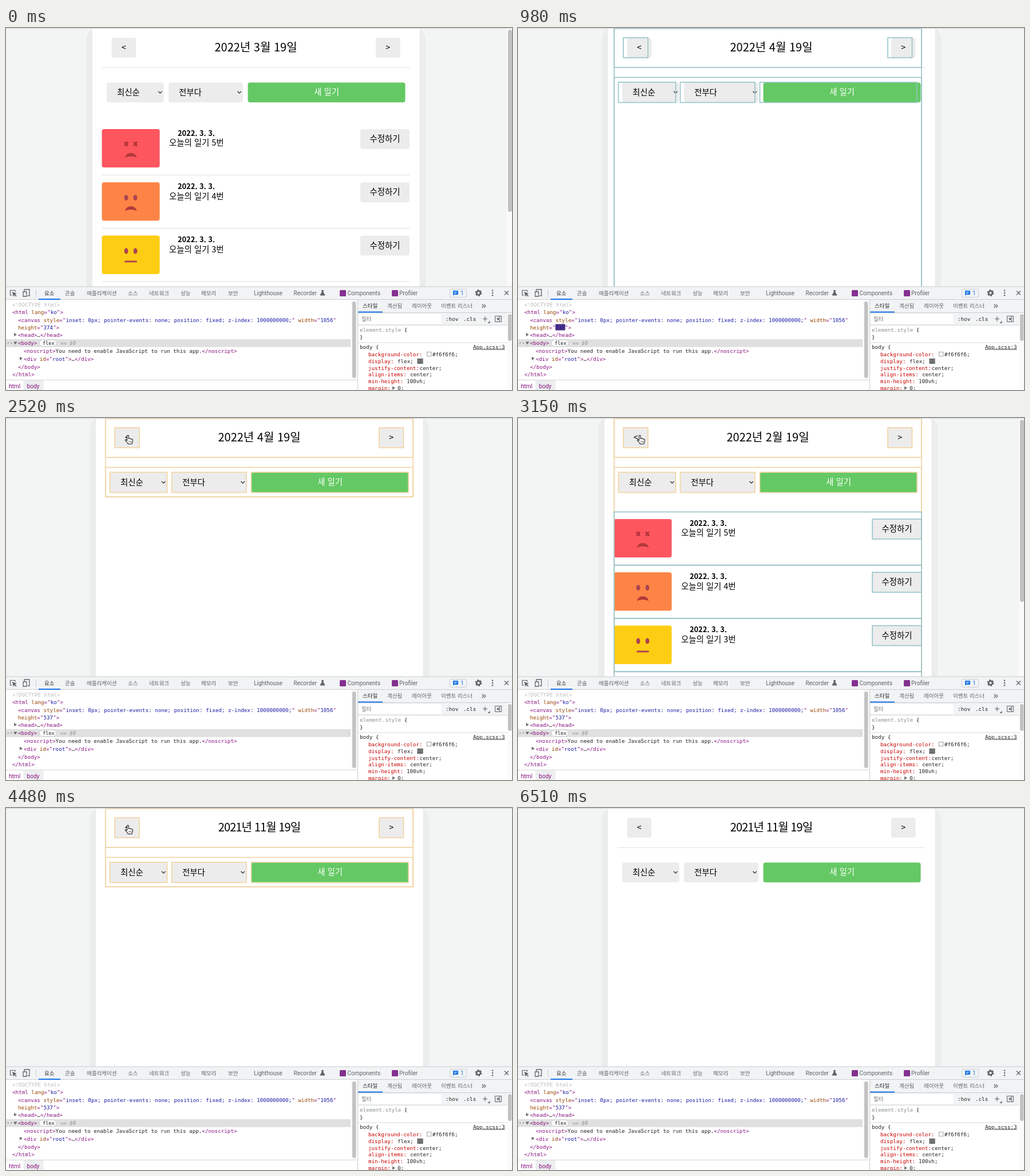
Write an HTML page that moves like this. It is 884 px wide and 634 px high and loops after 6.93 s.

```html
<!DOCTYPE html>
<html lang="ko">
<head>
<meta charset="utf-8">
<style>
html, body { margin: 0; width: 100%; height: 100%; overflow: hidden; background: #f3f5f5; }
svg { display: block; }
text { white-space: pre; }
.page { font: 14.4px "Noto Sans CJK KR", "Noto Sans CJK", sans-serif; }
.ui { font: 10.1px Roboto, "Noto Sans CJK KR", "Noto Sans CJK", sans-serif; fill: #5f6368; }
.ko { font: 9.5px "Noto Sans CJK KR", "Noto Sans CJK", sans-serif; fill: #5f6368; }
.code { font: 9.24px "DejaVu Sans Mono", monospace; fill: #222; }
.t { fill: #881280; } .a { fill: #994500; } .v { fill: #1a1aa6; }
.g { fill: #8a8f94; } .l { fill: #bdbdbd; } .r { fill: #c80000; } .k { fill: #222; }
.out { fill: none; stroke-width: 1.6; }
</style>
</head>
<body>
<svg id="stage" width="884" height="634" viewBox="0 0 884 634"></svg>
<script>
const esc = s => s.replace(/&/g, '&amp;').replace(/</g, '&lt;');
const rect = (x, y, w, h, fill, rx = 0, more = '') =>
  `<rect x="${x}" y="${y}" width="${w}" height="${h}" fill="${fill}" rx="${rx}" ${more}/>`;
const text = (x, y, s, cls = '', more = '') => `<text x="${x}" y="${y}" class="${cls}" ${more}>${esc(s)}</text>`;
const path = (d, stroke, width = 1, fill = 'none') =>
  `<path d="${d}" stroke="${stroke}" stroke-width="${width}" fill="${fill}"/>`;
const mid = 'text-anchor="middle"';
// Coloured code: parts split by "~", each led by its class letter
const code = (x, y, s) => `<text x="${x}" y="${y}" class="code">` +
  s.split('~').map(p => `<tspan class="${p[0]}">${esc(p.slice(1))}</tspan>`).join('') + '</text>';
const box = (x, y, r, b) => `<rect x="${x}" y="${y}" width="${r - x}" height="${b - y}"/>`;

const PITCH = 93.3;
const rows = [0, 1, 2].map(i => i * PITCH);
const button = (x, y, w, label, fill = '#ececec', ink = '#000') =>
  rect(x, y, w, 34.8, fill, 4) + text(x + w / 2, y + 21.8, label, '', `${mid} fill="${ink}"`);
const select = (x, w, label) => rect(x, 95.5, w, 34.8, '#ececec', 4) +
  text(x + 18, 117.5, label) + path(`M${x + w - 9.5} 111l3.2 3.2 3.2-3.2`, '#222', 1.1);

function eyes(i) {
  return [210, 226].map(x => i
    ? `<ellipse cx="${x}" cy="204" rx="3.4" ry="5" fill="#b5423f"/><ellipse cx="${x - 1}" cy="203" rx="1.3" ry="3" fill="#8f4a80"/>`
    : path(`M${x - 3} 199.5l6 7m0-7l-6 7`, '#b5333b', 2.8)).join('');
}

function item(y, i) {
  const mouth = i < 2
    ? path('M208 227Q210 219 218 219T228.500 227Q218 222.500 208 227Z', 'none', 0, '#b0383a')
    : rect(207, 221, 22, 3, '#b0444f', 1.5);
  return `<g transform="translate(0 ${y})">` +
    rect(167.5, 177, 101, 67.3, ['#fd565f', '#fd8446', '#fdcd14'][i], 4) + eyes(i) + mouth +
    text(332.5, 188.8, '2022. 3. 3.', '', `${mid} font-size="12.8" font-weight="bold"`) +
    text(285, 206.3, `오늘의 일기 ${5 - i}번`) + button(619, 177.2, 86, '수정하기') +
    rect(168, 257, 537, 1, '#dfdfdf') + '</g>';
}

const page = `<g class="page"><g id="sheet">
  ${rect(140.5, -4, 592.5, 480, '#ebecec', 24)}${rect(151, 0, 571.5, 453, '#fff')}
  ${rect(168, 69, 537, 1, '#e2e2e2')}
  ${button(184.5, 17.3, 42.5, '<')}${button(646, 17.3, 42.5, '>')}
  ${text(436.5, 40.5, '', '', `id="title" ${mid} font-size="20"`)}
  ${select(176, 99.6, '최신순')}${select(284, 130, '전부다')}
  ${button(422.5, 95.5, 275, '새 일기', '#64c964', '#fff')}
  <g id="list">${rows.map(item).join('')}</g></g>
  <g id="bar">${rect(875, 0, 9, 453, '#fafafa')}${rect(877, 3, 7, 319, '#c2c2c2', 3.5)}</g></g>`;

const outlines = `<g id="head" class="out">
  ${box(167.8, 1, 705, 69)}
  ${[[184, 17, 227, 52], [646, 17, 688.5, 52], [175.5, 95, 275.5, 130.5], [283.5, 95, 414, 130.5],
    [422.5, 95, 697, 130.5]].map(b => box(...b)).join('')}
  <g id="tall">${box(167.8, 1, 705, 460)}${box(167.8, 86.5, 705, 460)}</g>
  <g id="short">${box(167.8, 1, 705, 138)}${box(167.8, 86.5, 705, 138)}</g></g>
  <g id="items" class="out" stroke="#96c3c7">
  ${rows.map(y => box(167.8, 164.5 + y, 705, 257.5 + y) + box(619, 177 + y, 705, 212 + y)).join('')}
  ${box(167.8, 444.5, 705, 540)}</g>`;

const cursor = `<g id="hand">${path('M211.500 40V31.500q0-1.500 1.300-1.500t1.300 1.500V36q2-1 2.600.500 2-.8 2.500.700 2.300-.5 2.300 1.500 0 3.500-1.500 5.300v1.500h-7v-1.300l-4.500-4.700q-.8-1.500.7-2 1.300 0 2.300 2.500Z', '#222', 1.1, '#fff')}
  ${path('M215 40v3m2-3v3m2-3v3', '#333', .7)}</g>`;

const tabs = [[67, '요소'], [103, '콘솔'], [141, '애플리케이션'], [213, '소스'], [250, '네트워크'],
  [305, '성능'], [341, '메모리'], [388, '보안']];
const arrow = (x, y, down) => path(down ? `M${x} ${y - 2}h6l-3 5z` : `M${x} ${y - 3}l5 3-5 3z`, 'none', 0, '#6e6e6e');

const toolbar = rect(0, 453, 884, 181, '#fff') + rect(0, 453, 884, 23, '#f1f3f4') +
  rect(0, 452.5, 884, 1, '#cacdd1') + rect(0, 475, 884, 1, '#cacdd1') + rect(57, 474, 38, 2, '#1a73e8') +
  path('M16 462v-2.500h-8.500v8.500h3', '#5f6368', 1.2) + path('M11 462l8 3-3.400 1.200 3 3-1.300 1.300-3-3-1.300 3.400z', 'none', 0, '#5f6368') +
  path('M32 461v-3h9v11h-3M30 462h6v8h-6z', '#5f6368', 1.3) + rect(52, 458, 1, 13, '#cacdd1') +
  tabs.map(([x, s], i) => text(x, 467.6, s, 'ko', i ? '' : 'style="fill:#222"')).join('') +
  text(433, 467.8, 'Lighthouse', 'ui') + text(502.500, 467.8, 'Recorder', 'ui') +
  path('M551 459.500h4m-3 0v3l-3 5.500h8l-3-5.500v-3z', '#5f6368', 1, '#5f6368') +
  rect(583, 459, 11, 11, '#84308f', 1.5) + text(596.5, 467.8, 'Components', 'ui') +
  rect(674, 459, 11, 11, '#84308f', 1.5) + text(687, 467.8, 'Profiler', 'ui') +
  rect(775.5, 457.5, 29, 14, '#f1f3f4', 2, 'stroke="#cacdd1"') +
  path('M781 460h9v7h-7l-2 2z', 'none', 0, '#1a73e8') + path('M783 462.500h5m-5 2h3.500', '#fff', .8) +
  text(794, 467.8, '1', 'ui', 'style="fill:#1a73e8"') +
  '<circle cx="825.5" cy="464" r="3.4" fill="none" stroke="#5f6368" stroke-width="2.6"/>' +
  '<circle cx="825.5" cy="464" r="5" fill="none" stroke="#5f6368" stroke-width="2" stroke-dasharray="2.6 2.636"/>' +
  [459.8, 464, 468.2].map(y => `<circle cx="850" cy="${y}" r="1.3" fill="#5f6368"/>`).join('') +
  path('M871 460.500l7 7m0-7l-7 7', '#5f6368', 1.4);

const elements = rect(0, 545, 602.5, 13.8, '#e0e0e0') +
  code(11, 487.5, 'l<!DOCTYPE html>') +
  code(11, 501, 't<html ~alang~t="~vko~t">') +
  code(21, 514.5, 't<canvas ~astyle~t="~vinset: 0px; pointer-events: none; position: fixed; z-index: 1000000000;~t" ~awidth~t="~v1056~t"') +
  rect(65.3, 518.5, 17.2, 11, 'rgb(80,47,130)', 1, 'id="flash"') +
  `<text x="21" y="527.6" class="code"><tspan class="a">height</tspan><tspan class="t">="</tspan><tspan id="height" class="v"></tspan><tspan class="t">"&gt;</tspan></text>` +
  arrow(14, 537, 0) + code(21, 541, 't<head>~k…~t</head>') +
  text(1, 555, '···', 'code') + arrow(13.5, 551.5, 1) + code(21, 555, 't<body>') +
  rect(58.500, 546.5, 29.500, 11, '#fff', 5.500, 'stroke="#cacdd1"') +
  text(64, 554.8, 'flex', 'code', 'style="font-size:8.6px"') +
  text(95, 555, '== ', 'code', 'style="fill:#8a8f94"') + text(111, 555, '$0', 'code', 'style="fill:#8a8f94;font-style:italic"') +
  code(31, 569, 't<noscript>~kYou need to enable JavaScript to run this app.~t</noscript>') +
  arrow(24, 578.8, 0) + code(31, 582.6, 't<div ~aid~t="~vroot~t">~k…~t</div>') +
  code(21, 596.5, 't</body>') + code(11, 610, 't</html>') +
  rect(602.5, 476, 11, 140, '#fafafa') + rect(605, 479, 6.5, 134, '#c2c2c2', 3.2) +
  rect(0, 616, 614, 1, '#d5d7da') + rect(30.5, 617, 35, 17, '#eceef0') +
  text(5, 630.5, 'html', 'ui', 'style="fill:#881280"') + text(36.5, 630.5, 'body', 'ui', 'style="fill:#881280"');

const property = (y, name, value, x) => text(633, y, name + ':', 'code', 'style="fill:#c80000"') + text(x, y, value, 'code');
const styles = rect(614, 476, 270, 44, '#f1f3f4') + rect(614, 476, 1, 158, '#cacdd1') +
  rect(615, 498, 269, 1, '#cacdd1') + rect(615, 496.500, 43, 2, '#1a73e8') + rect(615, 520, 261, 1, '#d5d7da') +
  [[623, '스타일'], [666, '계산됨'], [709, '레이아웃'], [760, '이벤트 리스너']].map(([x, s], i) =>
    text(x, 490.3, s, 'ko', i ? '' : 'style="fill:#222"')).join('') +
  path('M831.500 484l3 3-3 3m3.500-6l3 3-3 3', '#5f6368', 1.1) +
  rect(616, 501, 144, 17, '#fff') + text(621, 513, '필터', 'ko', 'style="fill:#757575"') +
  text(768, 513, ':hov', 'code') + text(799, 513, '.cls', 'code') +
  path('M833 509.500h8m-4-4v8', '#5f6368', 1.2) + path('M845.500 513v4h-4z', 'none', 0, '#5f6368') +
  path('M854.500 504.500h11v10h-11zM862.500 504.500v10', '#5f6368', 1) + path('M861 506.500v6l-4-3z', 'none', 0, '#5f6368') +
  code(618, 531.5, 'gelement.style ~k{') + code(618, 545, 'k}') + rect(615, 550.5, 261, 1, '#d5d7da') +
  code(618, 561.5, 'kbody {') + text(816, 561.5, 'App.scss:3', 'code', 'text-decoration="underline"') +
  property(575, 'background-color', '#f6f6f6;', 745) + rect(735.5, 567.5, 7.5, 7.5, '#f6f6f6', 0, 'stroke="#999" stroke-width=".8"') +
  property(587, 'display', 'flex;', 684) +
  rect(718, 578, 11, 10.5, '#c9cbce', 1) + [580, 584.5].map(y => [719.3, 722.6, 725.9].map(x =>
    rect(x, y, 2, 2.8, 'none', 0, 'stroke="#333" stroke-width=".9"')).join('')).join('') +
  property(598.5, 'justify-content', 'center;', 722.5) + property(610.3, 'align-items', 'center;', 706) +
  property(622, 'min-height', '100vh;', 700) + property(633.7, 'margin', '0;', 684) + arrow(675, 630.5, 0) +
  rect(876, 499, 8, 135, '#fafafa') + rect(877, 501, 6.5, 47, '#c2c2c2', 3.2);

const stage = document.getElementById('stage');
stage.innerHTML = page + outlines + rect(0, 0, 884, 1, '#d0d2d3') + cursor + toolbar + elements + styles;
const $ = id => document.getElementById(id);
const show = (id, on) => $(id).setAttribute('display', on ? 'inline' : 'none');
const shift = (id, dx) => $(id).setAttribute('transform', `translate(${dx} 0)`);

const LOOP = 6930, SHIFT = 6, AMBER = '#f2d3a0';
// start, year, month, list shown, outline colour, outlines moved with the narrower page
const states = [
  [0, 2022, 3, 1, '', 0],
  [630, 2022, 4, 0, '#96c3c7', 0],
  [1050, 2022, 5, 0, '#b5c7b2', 1],
  [1470, 2022, 6, 0, '#d7cca8', 1],
  [2030, 2022, 5, 0, '#e5d0a3', 1],
  [2380, 2022, 4, 0, AMBER, 1],
  [2730, 2022, 3, 1, AMBER, 0],
  [3150, 2022, 2, 1, AMBER, 0],
  [3220, 2022, 2, 0, AMBER, 0],
  [3640, 2022, 1, 0, AMBER, 1],
  [4060, 2021, 12, 0, AMBER, 1],
  [4480, 2021, 11, 0, AMBER, 1],
  [5880, 2021, 11, 0, '', 1]
];

function draw(now) {
  const t = now % LOOP;
  const [, year, month, list, color, moved] = states.filter(s => s[0] <= t).pop();
  $('title').textContent = `${year}년 ${month}월 19일`;
  $('title').setAttribute('letter-spacing', month > 9 ? -.9 : 0);
  shift('sheet', list ? 0 : SHIFT);
  show('list', list);
  show('bar', list);
  show('head', color);
  $('head').setAttribute('stroke', color || 'none');
  shift('head', moved * SHIFT);
  show('tall', !moved);
  show('short', moved);
  show('items', t >= 630 && t < 980 || t >= 2730 && t < 3500);
  show('hand', t >= 2520 && t < 6510);
  $('height').textContent = t < 700 ? 374 : 537;
  $('flash').setAttribute('opacity', t < 700 ? 0 : Math.max(0, Math.min(1, (2100 - t) / 1050)));
  requestAnimationFrame(draw);
}
draw(performance.now());
</script>
</body>
</html>
```
